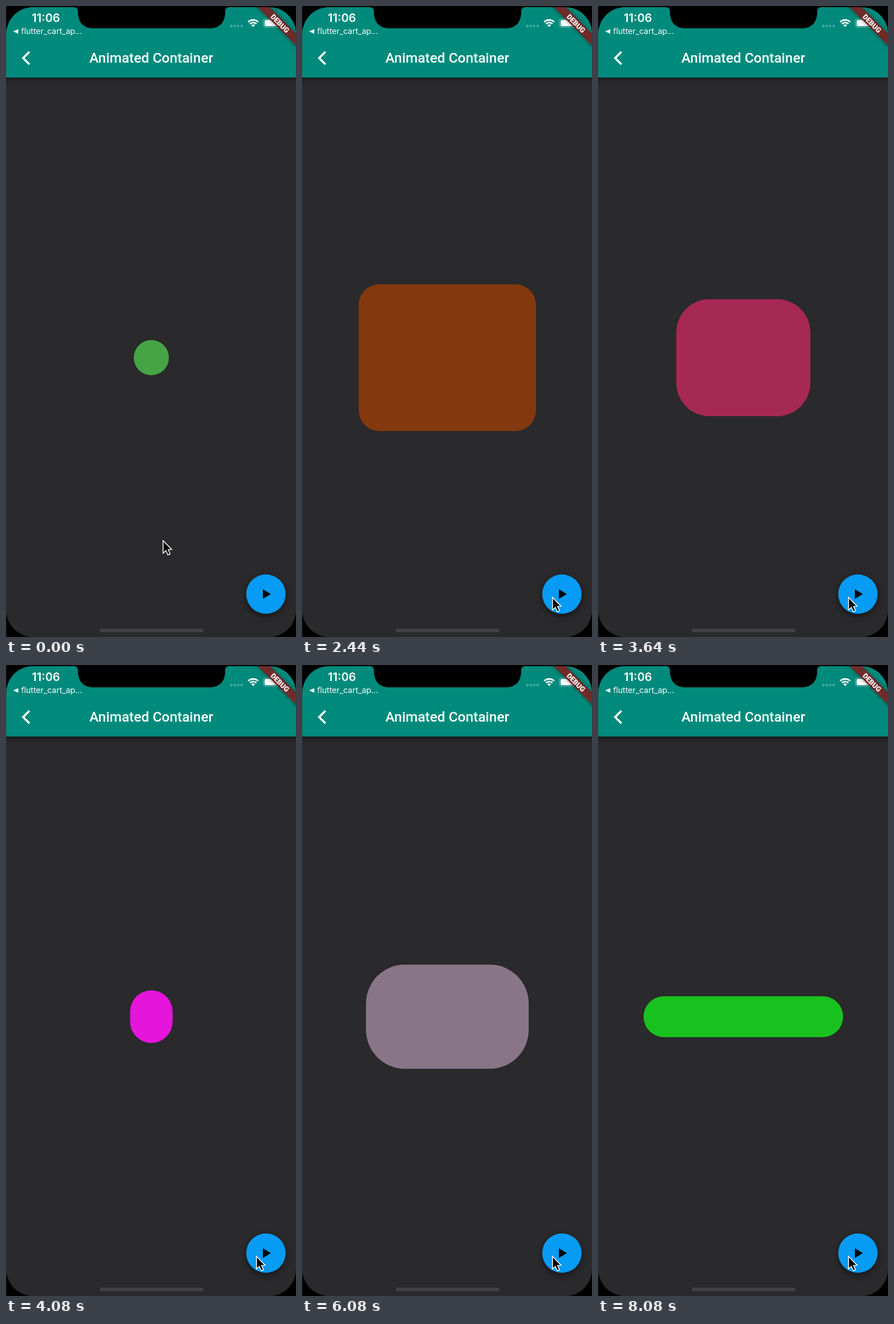
Recreate the animation shown at these times as an HTML page with a canvas. Size 508x1103 px, loop 8.16 s.

```html
<!DOCTYPE html>
<html lang="en">
<head>
<meta charset="utf-8">
<title>Animated Container</title>
<style>
  html, body { margin: 0; width: 100%; height: 100%; overflow: hidden; background: #000; }
  canvas { display: block; width: 508px; height: 1103px; }
</style>
</head>
<body>
<canvas id="stage" width="508" height="1103"></canvas>
<script>
const W = 508, H = 1103, LOOP = 8160;
const ctx = document.getElementById('stage').getContext('2d');

const FAB = { x: 455.3, y: 1028, r: 34.5 };
const CENTER = { x: 254.6, y: 614.7 };
const MORPH = 1000;

// Each tap sends the box towards a new size, radius and colour.
const START = { w: 61.5, h: 61.5, r: 36, rgb: [69, 165, 70] };
const TAPS = [
  { at: 1680, w: 320, h: 264, r: 36, rgb: [133, 52, 12] },
  { at: 3355, w: 61.5, h: 83, r: 103, rgb: [234, 19, 231] },
  { at: 4710, w: 285, h: 182, r: 68, rgb: [136, 118, 136] },
  { at: 6500, w: 349.5, h: 71.5, r: 40, rgb: [24, 194, 30] }
];

const clamp = v => Math.min(1, Math.max(0, v));
const mix = (a, b, k) => a + (b - a) * k;

// cubic-bezier(.4, 0, .2, 1)
function fastOutSlowIn(x) {
  if (x <= 0 || x >= 1) return clamp(x);
  let lo = 0, hi = 1, s = 0.5;
  for (let i = 0; i < 20; i++) {
    s = (lo + hi) / 2;
    const u = 1 - s;
    if (1.2 * u * u * s + 0.6 * u * s * s + s * s * s < x) lo = s; else hi = s;
  }
  return s * s * (3 - 2 * s);
}

function boxAt(t) {
  let box = START;
  for (const tap of TAPS) {
    const from = box, k = fastOutSlowIn((t - tap.at) / MORPH);
    box = {
      w: mix(from.w, tap.w, k),
      h: mix(from.h, tap.h, k),
      r: mix(from.r, tap.r, k),
      rgb: from.rgb.map((c, i) => mix(c, tap.rgb[i], k))
    };
  }
  return box;
}

function roundBox(x, y, w, h, r, fill) {
  ctx.beginPath();
  ctx.roundRect(x, y, w, h, r);
  ctx.fillStyle = fill;
  ctx.fill();
}

function poly(points, fill) {
  ctx.beginPath();
  points.forEach(([x, y]) => ctx.lineTo(x, y));
  ctx.closePath();
  ctx.fillStyle = fill;
  ctx.fill();
}

function disc(x, y, r, fill) {
  ctx.beginPath();
  ctx.arc(x, y, r, 0, 2 * Math.PI);
  ctx.fillStyle = fill;
  ctx.fill();
}

function label(text, x, y, font, align = 'left') {
  ctx.font = font;
  ctx.textAlign = align;
  ctx.fillStyle = '#fff';
  ctx.fillText(text, x, y);
}

function shadow(color, blur, y) {
  ctx.shadowColor = color;
  ctx.shadowBlur = blur;
  ctx.shadowOffsetY = y;
}

function drawNotch() {
  ctx.beginPath();
  ctx.moveTo(119, 0);
  ctx.lineTo(119, 2);
  ctx.quadraticCurveTo(126, 2, 126, 10);
  ctx.bezierCurveTo(126, 29, 136, 39, 153, 39);
  ctx.lineTo(357, 39);
  ctx.bezierCurveTo(374, 39, 384, 29, 384, 10);
  ctx.quadraticCurveTo(384, 2, 391, 2);
  ctx.lineTo(391, 0);
  ctx.closePath();
  ctx.fillStyle = '#000';
  ctx.fill();
}

function drawWifi() {
  const x = 433, y = 36.8, a = -Math.PI * 0.75, b = -Math.PI * 0.25;
  ctx.beginPath();
  ctx.moveTo(x, y);
  ctx.arc(x, y, 4.6, a, b);
  ctx.fillStyle = '#fff';
  ctx.fill();
  ctx.strokeStyle = '#fff';
  ctx.lineWidth = 2.7;
  for (const r of [7.9, 12.4]) {
    ctx.beginPath();
    ctx.arc(x, y, r, a, b);
    ctx.stroke();
  }
}

function drawStatus() {
  label('11:06', 70, 28, '600 20px Inter, "Liberation Sans", sans-serif', 'center');
  poly([[12.5, 44.5], [21.5, 40.5], [21.5, 48.5]], '#fff');
  label('flutter_cart_ap...', 26.5, 49, '400 14px Inter, "Liberation Sans", sans-serif');
  for (let i = 0; i < 4; i++) roundBox(392.5 + i * 6.1, 33, 4, 4, 1, 'rgba(255,255,255,.28)');
  drawWifi();
  ctx.beginPath();
  ctx.roundRect(451, 22.5, 29, 14.5, 4);
  ctx.strokeStyle = 'rgba(255,255,255,.45)';
  ctx.lineWidth = 1.2;
  ctx.stroke();
  roundBox(453, 24.3, 25, 11, 2.5, '#fff');
}

function drawBanner() {
  ctx.save();
  ctx.translate(509.5, 1);
  ctx.rotate(Math.PI / 4);
  shadow('rgba(0,0,0,.5)', 7, 0);
  ctx.fillStyle = '#702a28';
  ctx.fillRect(-60, 34.4, 120, 14.7);
  shadow('transparent', 0, 0);
  label('DEBUG', 0, 46.2, '900 12.5px Roboto, "Liberation Sans", sans-serif', 'center');
  ctx.restore();
}

function drawAppBar() {
  ctx.save();
  shadow('rgba(0,0,0,.45)', 8, 3);
  ctx.fillStyle = '#008a7c';
  ctx.fillRect(-10, -10, W + 20, 135);
  ctx.restore();
  ctx.beginPath();
  ctx.moveTo(41, 80);
  ctx.lineTo(30, 91);
  ctx.lineTo(41, 102);
  ctx.strokeStyle = '#fff';
  ctx.lineWidth = 3.6;
  ctx.stroke();
  label('Animated Container', 254.5, 99, '500 24.4px Roboto, "Liberation Sans", sans-serif', 'center');
}

function drawFab(t) {
  ctx.save();
  shadow('rgba(0,0,0,.5)', 11, 4);
  disc(FAB.x, FAB.y, FAB.r, '#069bf4');
  ctx.restore();
  for (const { at } of TAPS) {
    const k = (t - at) / 280;
    if (k <= 0 || k >= 1) continue;
    ctx.save();
    ctx.beginPath();
    ctx.arc(FAB.x, FAB.y, FAB.r, 0, 2 * Math.PI);
    ctx.clip();
    disc(439, 1034, 60 * k, `rgba(204,204,204,${0.16 * (1 - k)})`);
    ctx.restore();
  }
  poly([[450, 1019.5], [464, 1028], [450, 1036.5]], '#050505');
}

function drawBox(t) {
  const { w, h, r, rgb } = boxAt(t);
  roundBox(CENTER.x - w / 2, CENTER.y - h / 2, w, h, Math.min(r, w / 2, h / 2),
    `rgb(${rgb.map(Math.round)})`);
}

function drawCursor(t) {
  const k = fastOutSlowIn((t - 40) / 1200);
  ctx.save();
  ctx.translate(mix(275.2, 438.8, k), mix(934.5, 1033.8, k));
  ctx.beginPath();
  [[0, 0], [0, 22], [5, 17.4], [8.4, 25], [12.3, 23.3], [9, 15.8], [15, 15.4]]
    .forEach(([x, y]) => ctx.lineTo(x, y));
  ctx.closePath();
  ctx.fillStyle = '#000';
  ctx.fill();
  ctx.strokeStyle = '#fff';
  ctx.lineWidth = 1.5;
  ctx.stroke();
  ctx.restore();
}

function draw(t) {
  ctx.fillStyle = '#000';
  ctx.fillRect(0, 0, W, H);
  ctx.save();
  ctx.beginPath();
  ctx.roundRect(0.5, 2, 507.5, 1101, 47);
  ctx.clip();
  ctx.fillStyle = '#2a292b';
  ctx.fillRect(0, 0, W, H);
  drawBox(t);
  drawAppBar();
  drawStatus();
  drawBanner();
  drawFab(t);
  roundBox(164, 1088.5, 182, 6, 3, '#414042');
  ctx.restore();
  drawNotch();
  ctx.fillStyle = 'rgba(255,255,255,.1)';
  ctx.fillRect(0, 0, 1, H);
  drawCursor(t);
}

function tick() {
  draw(performance.now() % LOOP);
  requestAnimationFrame(tick);
}
tick();
</script>
</body>
</html>
```
